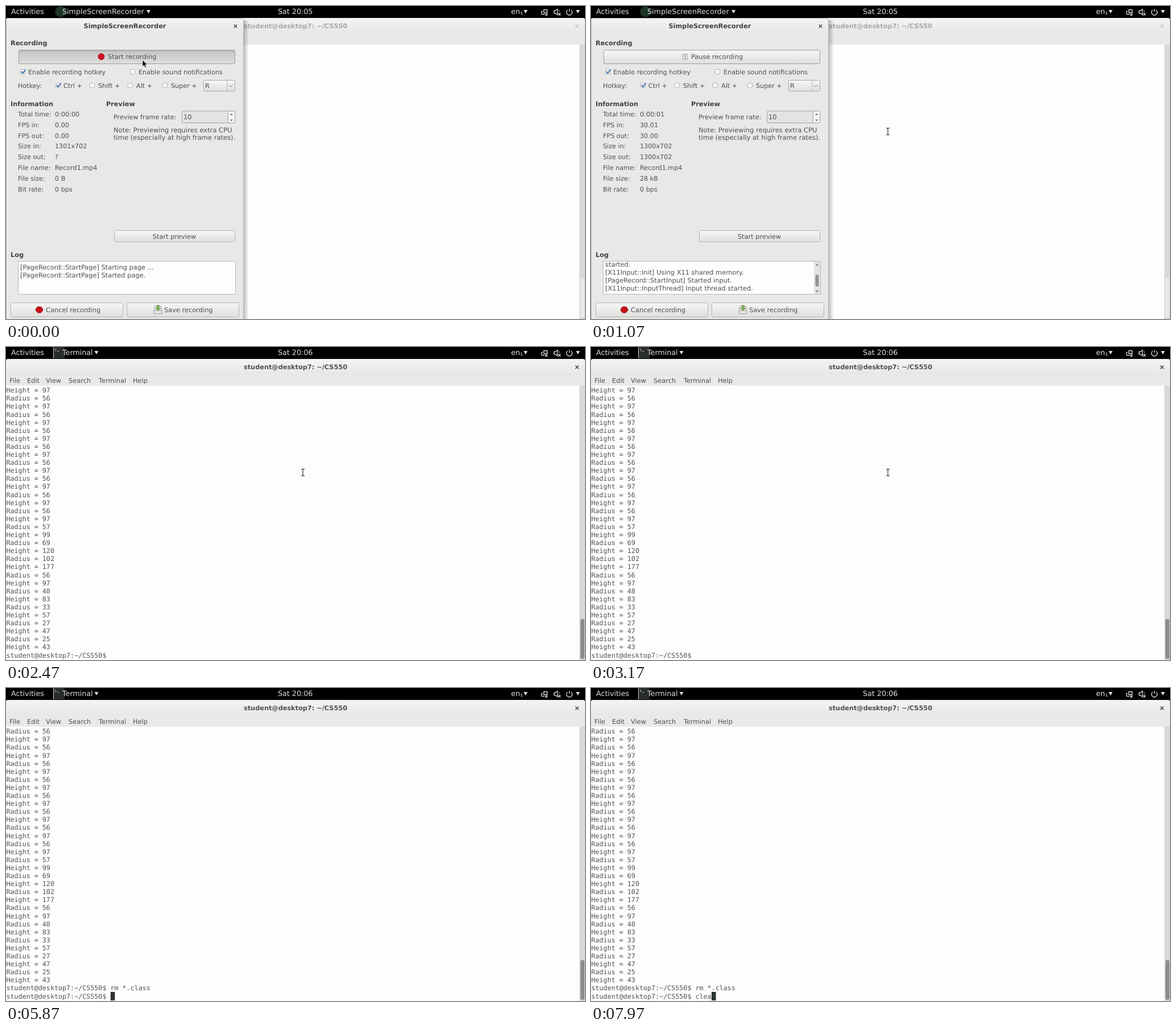
An HTML page that plays this animation: 1018x550 px, repeating every 8000 ms.

```html
<!DOCTYPE html>
<html lang="en">
<head>
<meta charset="utf-8">
<title>Screen recording</title>
<style>
html, body { margin: 0; width: 100%; height: 100%; overflow: hidden; background: #000; }
svg { display: block; width: 1018px; height: 550px; }
text { font-family: "DejaVu Sans", sans-serif; font-size: 11.4px; fill: #4c5153; text-rendering: geometricPrecision; }
.b { font-weight: bold; font-size: 11.3px; fill: #3d4244; }
.bar { font-size: 12.7px; fill: #dedede; }
.note { font-size: 11.5px; }
.opt { font-size: 11.2px; }
.term text { font-family: "DejaVu Sans Mono", monospace; font-size: 11.7px; fill: #505557; }
.line { fill: none; stroke: #dcdcdc; stroke-width: 1.3; }
</style>
</head>
<body>
<svg viewBox="0 0 1018 550">
  <defs>
    <linearGradient id="title" x2="0" y2="1"><stop stop-color="#f4f4f2"/><stop offset="1" stop-color="#e7e7e5"/></linearGradient>
    <linearGradient id="btn" x2="0" y2="1"><stop stop-color="#f6f6f5"/><stop offset="1" stop-color="#dfdfdd"/></linearGradient>
    <linearGradient id="down" x2="0" y2="1"><stop stop-color="#b4b4b2"/><stop offset=".2" stop-color="#cacac8"/><stop offset="1" stop-color="#dededc"/></linearGradient>
    <linearGradient id="shade"><stop stop-opacity=".24"/><stop offset="1" stop-opacity="0"/></linearGradient>
    <clipPath id="logClip"><rect x="22" y="449" width="381" height="57"/></clipPath>
  </defs>

  <g id="terminal">
    <path d="M0 550V25q0-4 4-4H1014q4 0 4 4V550z" fill="#e9e9e7"/>
    <path d="M0 48V25q0-4 4-4H1014q4 0 4 4V48z" fill="url(#title)"/>
    <rect y="68" width="1009" height="482" fill="#fdfdfc"/>
    <rect x="1008" y="68" width="10" height="482" fill="#d8d8d6"/>
    <rect id="thumb" x="1010" y="478" width="7" height="70" rx="3"/>
    <g id="menu"></g>
    <g id="rows" class="term"></g>
    <rect id="block" y="534" width="7.6" height="15" fill="#2e3436"/>
  </g>

  <g id="dialog">
    <rect x="418" y="25" width="9" height="525" fill="url(#shade)"/>
    <path d="M0 550V25q0-4 4-4H414q4 0 4 4V550z" fill="#e8e8e6"/>
    <path d="M1 48V25q0-4 4-4H413q4 0 4 4V48z" fill="url(#title)"/>
    <path d="M.5 550V25.500q0-4 4-4H413.500q4 0 4 4V550" fill="none" stroke="#b5b5b3"/>
    <g id="controls"></g>
    <g id="startFace">
      <circle cx="167.500" cy="89" r="5.500" fill="#cf1126" stroke="#9c1020" stroke-width=".8"/>
    </g>
    <g id="pauseFace" fill="#f4f4f4" stroke="#a0a0a0">
      <rect x="161.500" y="84.500" width="3" height="9"/><rect x="166.500" y="84.500" width="3" height="9"/>
    </g>
    <path d="M55.900 528.300h5.200l3.600 3.600v3.700l-3.600 3.600h-5.200l-3.600-3.600v-3.700z" fill="#c80f16" stroke="#7d2a2c" stroke-width=".8"/>
    <path d="M262 527h10l2 8v5.500h-14V535z" fill="#e6e8e6" stroke="#9a9d9a"/>
    <path d="M260 535.500h14" stroke="#a9aca9"/>
    <path d="M265.500 526h3.500v5h2.500l-4.250 4.500-4.250-4.500h2.500z" fill="#86b452" stroke="#55803a" stroke-width=".8"/>
    <g id="logA" clip-path="url(#logClip)"></g>
    <g id="logB" clip-path="url(#logClip)">
      <rect x="392" y="449" width="11" height="57" fill="#e2e2e0"/>
      <rect x="394.500" y="472" width="6" height="21" rx="3" fill="#929492"/>
      <path d="M395 456l2.500-3 2.500 3zM395 500l2.500 3 2.500-3z" fill="#777"/>
    </g>
  </g>

  <rect width="1018" height="21" fill="#000"/>
  <g id="panel"></g>
  <circle id="recIcon" cx="96" cy="10" r="9.500" fill="#1c3626"/>
  <g id="termIcon">
    <rect x="84" y="0" width="19" height="20" fill="#282c2d"/>
    <path d="M83.500 0V20" stroke="#c9c9c9"/>
    <path d="M86 3l2.500 2-2.500 2M90 7.500h3" fill="none" stroke="#ccc"/>
  </g>
  <g id="appName"></g>
  <g class="line">
    <path d="M945.500 6.500h6v5h-6zM941.500 14.500v-5h2M942 14.500h5M948 13l4 4m0-4l-4 4"/>
    <path d="M963.500 8.500h2l4-3v10l-4-3h-2zM971 12.500l4 4m0-4l-4 4"/>
    <path d="M971 6.500q3 2 2 5" opacity=".5"/>
    <path d="M987.500 7a5 5 0 1 0 6 0M990.500 5v5"/>
  </g>
  <path d="M910 7h7l-3.500 6zM1002 7h7l-3.500 6z" fill="#dedede"/>
  <path id="appArrow" d="M0 7h7l-3.500 6z" fill="#dedede"/>

  <path id="arrow" d="M0 0V11.500l2.700-2.500 2 4.300 2-1-2-4.200H8.500z" fill="#000" stroke="#fff" stroke-width=".7"/>
  <path id="beam" d="M-3-6h2l1 1 1-1h2M0-5V5M-3 6h2l1-1 1 1h2" fill="none" stroke="#333" stroke-width="1.200"/>
</svg>

<script>
const $ = id => document.getElementById(id);
const LOOP = 8000, ROW = 14.1, CELL = 7.04;
const HOME = "student@desktop7";
const PROMPT = HOME + ":~/CS550$";

function add(parent, tag, attrs) {
  const el = document.createElementNS("http://www.w3.org/2000/svg", tag);
  for (const k in attrs) el.setAttribute(k, attrs[k]);
  return parent.appendChild(el);
}
// y is the middle of the capitals
function label(parent, x, y, str, cls = "", anchor = "start") {
  const el = add(parent, "text", { x, y: y + 4.2, class: cls, "text-anchor": anchor });
  el.textContent = str;
  return el;
}
function box(parent, x, y, width, height, fill, stroke = "#b3b3b1", rx = 2) {
  return add(parent, "rect", { x: x + .5, y: y + .5, width: width - 1, height: height - 1, rx, fill, stroke });
}
const show = (el, on) => { el.style.display = on ? "" : "none"; };
const put = (el, str) => { if (el.textContent !== str) el.textContent = str; };
const place = (el, x, y) => el.setAttribute("transform", `translate(${x} ${y})`);

// Top panel
const panel = $("panel");
label(panel, 9, 9.8, "Activities", "bar");
const clock = label(panel, 478, 9.8, "", "bar");
label(panel, 888, 9.8, "en", "bar");
label(panel, 904, 10.5, "₁", "bar");
const appName = label($("appName"), 99, 9.8, "", "bar");

// Terminal window
const heading = label($("menu"), 509, 35, HOME + ": ~/CS550", "b", "middle");
const closeMark = label($("menu"), 1004, 35, "×", "b", "middle");
[[6, "File"], [37, "Edit"], [70, "View"], [110, "Search"], [163, "Terminal"], [223, "Help"]]
  .forEach(([x, s]) => label($("menu"), x, 58.5, s));

const values = [57, 99, 69, 120, 102, 177, 56, 97, 48, 83, 33, 57, 27, 47, 25, 43];
const output = Array.from({ length: 33 }, (_, i) =>
  i % 2 ? `Radius = ${i < 17 ? 56 : values[i - 17]}`
        : `Height = ${i < 17 ? 97 : values[i - 17]}`);
const rows = Array.from({ length: 34 }, (_, i) => label($("rows"), .5, 76 + ROW * i, ""));

// Recorder dialog
const ui = $("controls");
label(ui, 209, 35, "SimpleScreenRecorder", "b", "middle");
label(ui, 403.5, 35, "×", "b", "middle");
[[8, 65, "Recording"], [8, 172, "Information"], [176, 172, "Preview"], [8, 437, "Log"]]
  .forEach(([x, y, s]) => label(ui, x, y, s, "b"));

const mainButton = box(ui, 22, 77, 381, 25, "url(#btn)", "#9c9c9e");
[[190, 394, 213, 21], [8, 521, 198, 26], [212, 521, 198, 26]]
  .forEach(r => box(ui, ...r, "url(#btn)"));
label(ui, 296, 404.3, "Start preview", "", "middle");
label(ui, 70, 533.5, "Cancel recording");
label(ui, 278, 533.5, "Save recording");

function check(x, y, on) {
  box(ui, x, y, 9, 9, "#fafafa", "#b0b0ae", 1);
  if (on) add(ui, "path", { d: `M${x + 2} ${y + 4}l2.500 3 5-6.500`, fill: "none", stroke: "#3a6fae", "stroke-width": 2 });
}
[[25, 111, 39, "Enable recording hotkey", 1], [218, 111, 233, "Enable sound notifications", 0],
 [87, 135, 101, "Ctrl +", 1], [147, 135, 162, "Shift +", 0], [214, 135, 229, "Alt +", 0], [275, 135, 290, "Super +", 0]]
  .forEach(([x, y, tx, s, on]) => { check(x, y, on); label(ui, tx, y + 4.7, s, "opt"); });
label(ui, 21, 139.7, "Hotkey:", "opt");
box(ui, 347, 130, 56, 20, "url(#btn)", "#a6a6a4");
label(ui, 350, 140, "R");
add(ui, "path", { d: "M388.500 131v18", stroke: "#bcbcba" });
add(ui, "path", { d: "M391.500 138.500l3.500 3.500 3.500-3.500", fill: "none", stroke: "#777" });

label(ui, 189, 194.7, "Preview frame rate:", "opt");
box(ui, 309, 184, 94, 22, "#e3e3e1", "#a6a6a4");
box(ui, 390, 184, 13, 22, "#f6f6f5", "#9a9a98");
add(ui, "path", { d: "M394 191.500l2.500-3 2.500 3zM394 199.500l2.500 3 2.500-3z", fill: "#666" });
label(ui, 312, 194.7, "10");
label(ui, 189, 217.6, "Note: Previewing requires extra CPU", "note");
label(ui, 189, 231.2, "time (especially at high frame rates).", "note");

const info = ["Total time", "FPS in", "FPS out", "Size in", "Size out", "File name", "File size", "Bit rate"]
  .map((s, i) => {
    const y = 189.7 + 18.8 * i;
    label(ui, 21, y, s + ":", "opt");
    return label(ui, 86, y, "", "opt");
  });
const stats = [
  [0, "0:00:00|0.00|0.00|1301x702|?|Record1.mp4|0 B|0 bps"],
  [870, "0:00:01|30.01|30.00|1300x702|1300x702|Record1.mp4|28 kB|0 bps"],
  [1870, "0:00:02|30.01|30.00|1300x702|1300x702|Record1.mp4|56 kB|194 kbps"]
].map(([at, s]) => [at, s.split("|")]);

box(ui, 21, 448, 383, 59, "#fdfdfc", "#b9b9b7", 0);
label($("startFace"), 179, 89, "Start recording");
label($("pauseFace"), 176, 89, "Pause recording").style.stroke = "none";
["[PageRecord::StartPage] Starting page ...", "[PageRecord::StartPage] Started page."]
  .forEach((s, i) => label($("logA"), 25, 459 + 14 * i, s));
["started.", "[X11Input::Init] Using X11 shared memory.", "[PageRecord::StartInput] Started input.",
 "[X11Input::InputThread] Input thread started."]
  .forEach((s, i) => label($("logB"), 25, 453.7 + 14 * i, s));

// Timeline
const START = 130, FOCUS = 2470, TYPE = 3970, ENTER = 5370;
const route = [[60, 240, 95], [430, 416, 190], [800, 522, 220.5]];

function pointer(t) {
  if (t <= route[0][0]) return route[0].slice(1);
  for (let i = 1; i < route.length; i++) {
    const [t0, x0, y0] = route[i - 1], [t1, x1, y1] = route[i];
    if (t < t1) {
      const k = (t - t0) / (t1 - t0);
      return [x0 + (x1 - x0) * k, y0 + (y1 - y0) * k];
    }
  }
  return route[route.length - 1].slice(1);
}

function typed(t) {
  if (t < TYPE) return "";
  if (t < ENTER) return "rm *.class".slice(0, t >= 4770 ? 10 : Math.min(9, 1 + Math.floor((t - TYPE) / 36)));
  return "clear".slice(0, [7800, 7870, 7930, 7968].filter(at => t >= at).length);
}

function blockOn(t) {
  if (t < 3430) return false;
  if (t < ENTER || t >= 7770) return true;
  return Math.floor((t - ENTER) / 600) % 2 === 0;
}

function draw(t) {
  const focused = t >= FOCUS, recording = t >= START, entered = t >= ENTER;

  put(clock, t < 1700 ? "Sat 20:05" : "Sat 20:06");
  put(appName, focused ? "Terminal" : "SimpleScreenRecorder");
  place($("appArrow"), focused ? 155.500 : 247, 0);
  show($("recIcon"), !focused);
  show($("termIcon"), focused);
  show($("dialog"), !focused);
  heading.style.fill = focused ? "#4d5254" : "#a8a9a8";
  closeMark.style.fill = focused ? "#34393b" : "#c4c4c2";
  $("thumb").setAttribute("fill", focused ? "#8b8d8b" : "#e9e9e7");

  show($("startFace"), !recording);
  show($("pauseFace"), recording);
  mainButton.setAttribute("fill", recording ? "url(#btn)" : "url(#down)");
  show($("logA"), t < 230);
  show($("logB"), t >= 230);
  const now = stats.filter(([at]) => t >= at).pop()[1];
  info.forEach((el, i) => put(el, now[i]));

  const input = typed(t);
  const lines = entered ? [...output.slice(1), PROMPT + " rm *.class"] : output.slice();
  lines.push(PROMPT + " " + input);
  rows.forEach((el, i) => put(el, lines[i]));
  show($("block"), blockOn(t));
  $("block").setAttribute("x", .8 + CELL * (PROMPT.length + 1 + input.length));

  const [x, y] = pointer(t), overText = x > 425;
  show($("arrow"), !overText);
  show($("beam"), overText && t < TYPE);
  place($(overText ? "beam" : "arrow"), x, y);
}

const began = performance.now();
function tick() {
  draw((performance.now() - began) % LOOP);
  requestAnimationFrame(tick);
}
draw(0);
tick();
</script>
</body>
</html>
```
